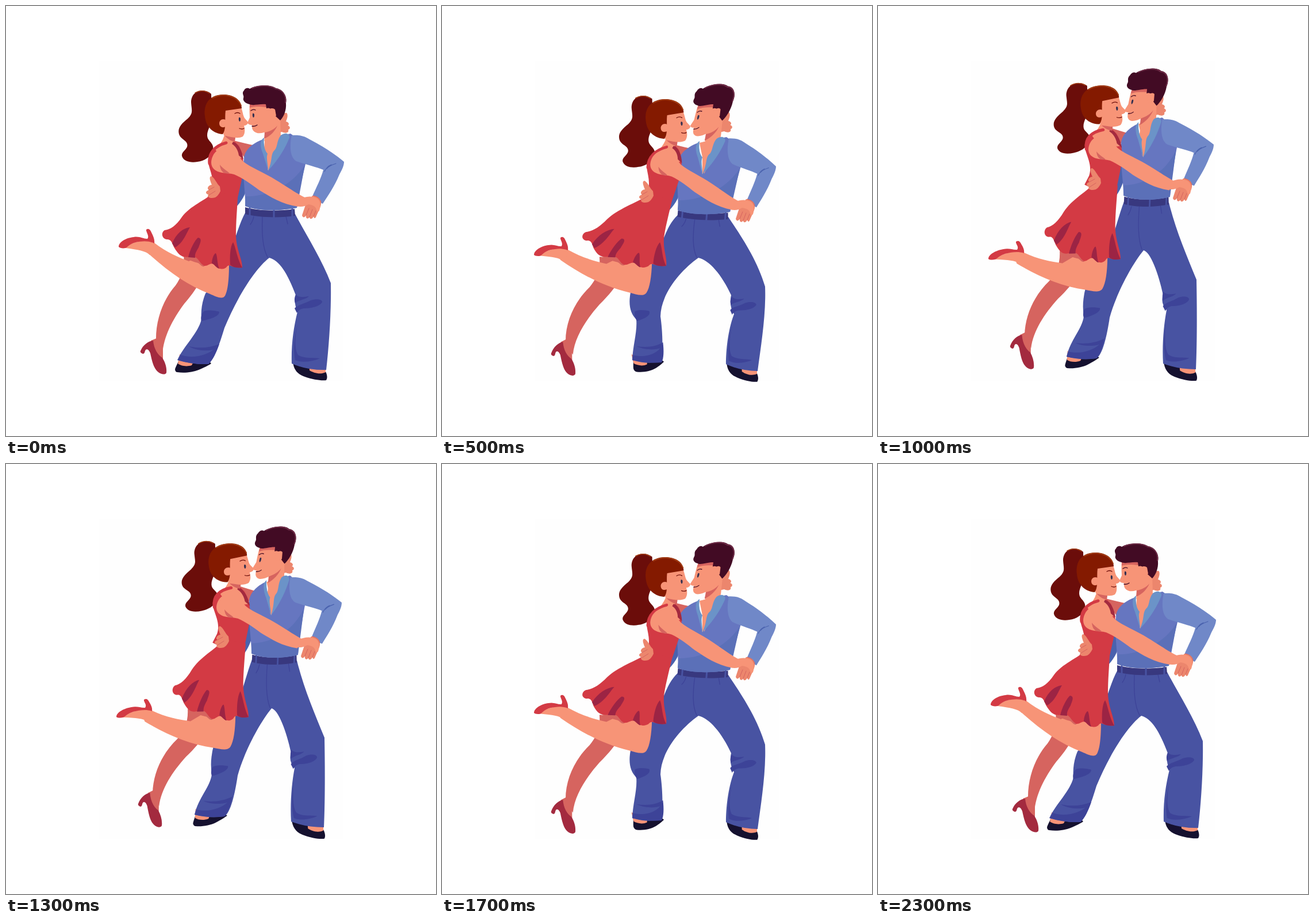
An HTML page that plays this animation: 748 by 748 pixels, repeating every 2400 ms.

```html
<!DOCTYPE html>
<html lang="en">
<head>
<meta charset="utf-8">
<title>Dancing couple</title>
<style>
html, body { margin: 0; width: 100%; height: 100%; overflow: hidden; background: #fff; }
svg { display: block; width: 100vw; height: 100vh; }
</style>
</head>
<body>
<svg id="stage" viewBox="0 0 748 748"><rect x="161" y="96" width="426" height="556" fill="#fefefe"/></svg>
<script>
const SKIN = '#f79477', SHADE = '#d6645f', HAND = '#ec866d';
const RED = '#d33a44', WINE = '#9c2444', SHOE = '#a32a3f';
const PANTS = '#4853a2', FOLD = '#3d4398', BELT = '#38387f', INK = '#15112f';
const SHIRT = '#6676c0', SLEEVE = '#7088c8', COLLAR = '#6b93c8', DEEP = '#4a62ae';
const MANE = '#420b24', TAIL = '#6b0d0a', CAP = '#841a00';

// Anchor points of each body part in four key poses: low left, rising, top, low right.
// One point moves a part, two turn it, three shear it.
const rigs = {
  head: ['445 139 488 165 421 203', '470 110 504 136 430 181', '477 97 510 123 435 168', '475 137 508 162 433 208'],
  neck: ['456 286 478 225 447 222', '460 262 484 198 454 198', '460 250 485 185 457 184', '456 292 485 228 456 225'],
  torso: ['518 226 417 350 505 352', '515 198 428 332 507 333', '513 184 427 321 502 322', '518 232 411 357 500 359'],
  sleeve: ['518 226 588 272 541 338', '515 198 584 242 540 307', '513 184 579 230 537 293', '518 232 581 280 538 344'],
  clasp: ['530 350', '528 320', '524 306', '526 356'],
  pelvis: ['416 356 503 360 458 438', '428 338 506 340 462 425', '427 326 501 328 456 417', '410 361 498 366 446 438'],
  shinR: ['565 482 557 632 498 622', '554 476 553 632 496 622', '543 474 552 630 493 622', '562 488 549 635 494 623'],
  shinL: ['340 545 352 623 299 616', '358 540 380 613 328 610', '360 532 388 610 340 606', '338 545 382 620 331 616'],
  neckHand: ['484 204', '491 174', '495 161', '495 203'],
  backHand: ['360 315', '375 301', '374 289', '355 323'],
  face: ['325 272 340 146 421 201', '332 257 346 133 431 181', '335 245 349 120 434 167', '334 281 348 155 432 208'],
  bodice: ['353 265 405 243 402 335', '361 240 415 222 415 314', '363 228 414 211 413 304', '358 272 412 250 399 340'],
  skirt: ['376 334 272 394 411 455', '391 316 290 390 422 440', '390 305 286 380 416 432', '370 339 245 397 390 452'],
  leg: ['387 452 378 508 258 413', '398 442 387 496 254 430', '393 432 381 488 241 431', '364 450 352 503 219 425'],
  foot: ['196 419 246 388 258 413', '192 440 242 409 254 430', '178 442 229 410 241 431', '160 433 208 402 219 425'],
  farLeg: ['310 436 330 487 261 583', '317 430 337 479 255 573', '308 422 327 470 239 562', '275 440 298 488 215 585'],
  farFoot: ['261 583 234 600 279 640', '255 573 230 591 271 631', '239 562 212 579 255 618', '215 585 190 604 232 642'],
  arm: ['372 262 515 342', '380 240 513 314', '382 227 508 301', '377 266 511 348']
};

const trousers = [
  'M417 358L503 362C522 398 549 440 565 482C566 530 562 590 557 633Q525 634 497 622C496 590 500 560 507 532Q500 515 504 503C490 465 475 442 458 438C430 460 400 512 380 560C371 590 362 615 352 623Q325 624 298 616C310 590 334 570 340 545Q338 522 347 500C390 460 396 395 417 358Z',
  'M428 340L506 342C518 390 536 432 554 476C555 530 555 590 553 632Q522 632 496 622C494 590 497 555 502 529Q491 516 496 503C488 465 474 428 462 425C440 452 414 502 403 542C398 575 391 606 380 613Q355 617 328 610C335 580 355 562 358 540Q354 515 362 487C404 440 411 385 428 340Z',
  'M427 328L501 331C510 388 525 430 543 474C546 530 550 590 552 630Q518 632 493 622C490 590 490 550 493 523Q482 514 487 500C478 465 470 421 456 417C432 452 409 500 403 537C400 570 398 601 388 610Q365 613 340 606C343 580 358 552 360 532Q351 512 356 482C402 435 409 375 427 328Z',
  'M411 363L498 367C518 397 548 440 562 488C564 535 555 590 549 635Q520 635 494 623C494 600 497 565 508 536Q499 522 503 503C487 468 465 442 446 438C415 460 381 500 380 540C383 560 385 592 382 613Q370 627 331 616C332 590 340 567 338 545Q322 530 328 498C386 440 380 390 411 363Z'
];

// [rig, colour, outline, line width when it is a stroke]
const parts = [
  ['neckHand', HAND, 'M474 200C480 190 486 183 489 187C491 192 488 198 487 201C493 202 493 207 490 208C495 209 495 214 491 215C493 221 486 222 480 219L466 222Z'],
  ['torso', DEEP, 'M414 268L398 352C410 340 417 328 420 312Z'],
  ['shinR', INK, 'M499 612C498 633 508 641 520 645C534 650 548 652 557 651C560 646 558 640 556 636L535 616Z'],
  ['shinR', SKIN, 'M527 616L556 620L556 637C546 642 535 638 528 634Z'],
  ['shinL', INK, 'M303 608C301 619 295 627 294 632C294 635 296 637 298 637C310 639 325 637 335 633C345 629 352 625 357 622L346 610Z'],
  ['shinL', SKIN, 'M302 606L330 612L323 625C314 628 304 626 299 622Z'],
  [null, PANTS, trousers],
  ['shinR', FOLD, 'M502 526C508 519 520 518 530 512C540 509 550 510 550 515C546 523 530 526 518 526C512 527 508 530 506 534Z'],
  ['shinR', FOLD, 'M504 502C510 508 519 506 527 505C521 511 509 511 503 517C501 512 502 506 504 502Z'],
  ['shinR', FOLD, 'M507 554C502 576 502 598 508 607C518 614 535 611 546 613C532 619 514 621 503 616C499 596 502 572 507 554Z'],
  ['shinL', FOLD, 'M344 531C352 528 366 530 371 532C371 540 355 545 340 548C338 543 340 536 344 531Z'],
  ['shinL', FOLD, 'M304 607C322 613 344 610 361 598C352 600 333 601 318 592C336 596 354 595 371 588C366 603 359 617 352 623Q325 624 299 616Z'],
  ['pelvis', FOLD, 'M446 367C445 395 446 420 455 437M431 366C430 372 428 376 425 380M487 366L490 379', 1.3],
  ['pelvis', BELT, 'M416 350C440 357 475 357 502 353L503 365C475 369 440 368 416 362Z'],
  ['pelvis', PANTS, 'M424 351V366M466 354V369M498 351V367', 3],
  ['bodice', SHADE, 'M396 234C408 237 420 240 434 243L415 264C408 254 402 246 396 234Z'],
  ['torso', SHIRT, 'M447 232C430 238 415 250 414 264C411 300 417 325 416 348C440 357 475 357 506 351C510 320 515 300 521 275C527 260 515 235 495 222L480 225L456 286Z'],
  ['torso', '#5b70b8', 'M417 331C455 332 498 312 520 276L506 351C475 357 440 357 416 348Z'],
  ['torso', SKIN, 'M449 232L455 257L456 286L468 268L482 240L480 224Z'],
  ['neck', SKIN, 'M449 216C452 232 449 240 449 250L456 286C463 270 466 250 476 233C480 225 476 210 478 190Z'],
  ['neck', SHADE, 'M450 220C460 218 467 214 472 208C468 218 460 226 449 231Z'],
  ['torso', COLLAR, 'M449 229C441 234 442 245 447 257L456 286C456 275 452 265 455 257C449 250 448 240 449 229Z'],
  ['torso', COLLAR, 'M478 225C486 219 494 222 493 229C485 250 470 272 456 286C464 268 460 259 466 252C473 247 470 235 478 225Z'],
  ['head', SKIN, 'M424 168C423 182 424 189 424 194L420 203C421 206 425 207 428 207C427 214 430 219 437 221C448 223 463 215 474 203L480 188L470 165Z'],
  ['head', SHADE, 'M424 169L453 167L453 176C442 175 432 174 424 177Z'],
  ['head', MANE, 'M413 160C415 156 409 152 414 147C416 142 421 142 424 144C435 137 460 136 470 143C482 145 490 158 487 169C488 182 483 193 477 199L466 189C464 180 459 176 453 178L452 171C440 170 430 174 424 171C419 170 411 166 413 160Z'],
  ['head', '#6c2a45', 'M428 143C440 138 459 137 469 144C480 145 488 155 486 168', 2],
  ['head', SKIN, 'M468 180C464 176 456 178 456 185C456 192 464 195 470 191Z'],
  ['head', MANE, 'M426 182Q430 179 434 181M428 209Q433 210 437 207', 1.3],
  ['head', '#343050', 'M429 187Q432 186 432 190Q432 194 430 194Q428 191 429 187Z'],
  ['farLeg', SHADE, 'M309 432C311 455 306 470 295 486C274 510 260 545 261 583L272 606C274 575 290 545 310 518C322 504 333 490 345 465L340 436Z'],
  ['farFoot', SHADE, 'M252 582C255 598 262 608 273 615L273 592L262 578Z'],
  ['farFoot', SHOE, 'M234 600C238 590 247 583 256 582C257 596 264 607 272 612C277 620 280 629 279 638C277 642 270 641 265 637C257 631 254 618 251 604C249 599 246 596 243 598C241 600 242 605 238 605C235 604 233 602 234 600Z'],
  ['leg', SKIN, 'M388 448C388 475 386 495 381 504C377 511 366 506 355 501C315 486 280 460 247 430C243 420 250 411 258 412C280 429 300 437 318 444L345 430Z'],
  ['foot', SKIN, 'M208 421C214 413 225 411 238 408C247 407 255 410 261 416L250 433C243 426 230 424 208 421Z'],
  ['foot', RED, 'M196 419C196 410 210 403 222 402C232 400 238 405 246 405C250 400 243 393 244 389C248 386 251 389 253 394C256 400 259 406 258 413C248 408 236 409 226 411C214 414 211 420 208 421C203 422 198 421 196 419Z'],
  ['face', TAIL, 'M357 153C345 142 322 146 322 168C323 182 326 186 316 196C305 205 298 212 301 223C304 233 318 234 315 245C312 252 305 254 306 261C309 271 322 273 333 271C350 269 363 256 360 244C358 236 350 234 350 225C350 215 357 208 358 195Z'],
  ['face', '#a43f16', 'M329 151Q342 144 354 152', 1.5],
  ['bodice', RED, 'M386 238C362 244 350 256 352 274C356 290 363 303 357 320L349 336L380 350L402 338L411 298C414 280 415 264 405 243L397 235Z'],
  ['skirt', SHADE, 'M306 425L350 430L345 453C340 454 338 449 334 447C326 445 316 441 308 436Z'],
  ['skirt', RED, 'M366 322C346 338 320 348 306 367C296 382 286 389 276 390C269 394 271 405 280 406C288 405 289 414 293 421C298 429 303 435 309 436C317 438 323 435 329 437C335 439 337 448 345 452C352 453 356 445 362 450C368 457 376 460 383 455C388 447 392 454 398 454C402 455 407 456 411 455C411 440 401 425 400 400C400 375 402 355 403 333Z'],
  ['skirt', WINE, 'M289 413C296 396 308 386 320 385C314 394 309 412 294 420Z'],
  ['skirt', WINE, 'M317 437C320 424 328 408 334 403C342 404 338 412 335 420C331 427 328 431 329 438Z'],
  ['skirt', WINE, 'M358 448C358 440 362 430 365 430C368 435 367 448 371 457C366 456 362 448 358 448Z'],
  ['skirt', WINE, 'M390 450C389 436 390 418 395 411C400 420 402 440 411 455C404 456 395 455 390 450Z'],
  ['bodice', SKIN, 'M382 210C381 228 376 238 364 249C370 262 390 270 411 264C404 252 401 244 397 237L400 225Z'],
  ['bodice', RED, 'M383 238C364 243 352 255 354 274', 5],
  ['bodice', SHOE, 'M395 236C404 239 411 252 413 267L405 260C404 252 400 244 393 240Z'],
  ['face', SHADE, 'M399 228L398 236C392 235 386 232 380 225Z'],
  ['face', SKIN, 'M380 178L409 176C412 184 412 190 415 195L421 202C421 206 417 208 414 208C416 215 416 222 412 227C404 231 394 229 379 225C375 214 378 190 380 178Z'],
  ['face', CAP, 'M346 192C343 168 356 154 378 154C397 154 410 164 410 178L382 182C380 196 384 213 377 223C362 222 348 212 346 192Z'],
  ['face', '#a43f16', 'M359 160C378 150 402 156 409 173', 1.8],
  ['face', SKIN, 'M382 198C376 195 371 199 371 204C371 211 378 213 383 209Z'],
  ['face', TAIL, 'M398 187Q403 184 407 187M406 213Q411 215 414 213', 1.3],
  ['face', '#343050', 'M405 194Q408 193 408 197Q408 201 406 201Q404 198 405 194Z'],
  ['backHand', HAND, 'M372 314C367 310 362 297 357 296C352 297 356 306 358 311C351 312 349 318 353 320C346 322 347 327 352 328C349 332 355 336 364 333C368 331 371 326 373 322Z'],
  ['backHand', SHADE, 'M353 320L362 315M353 329L364 322', 1],
  ['sleeve', SLEEVE, 'M497 225C514 224 520 227 530 233C555 246 575 260 588 271C588 278 584 286 580 293C571 315 560 330 551 344C545 342 538 337 533 331C540 315 548 300 552 285C540 280 522 276 505 270C492 262 494 238 497 225Z'],
  ['sleeve', DEEP, 'M554 288C557 281 561 278 566 276M558 283C562 278 568 276 574 274', 1.2],
  ['arm', SKIN, 'M357 272C358 256 370 245 385 248C397 252 405 262 412 270C425 281 450 290 470 303C490 315 508 328 522 334L508 349C480 345 460 332 440 320C427 310 411 299 397 293C390 291 382 291 376 290C364 288 357 282 357 272Z'],
  ['arm', SHADE, 'M372 276C377 283 384 286 389 291C380 293 373 289 372 276Z'],
  ['clasp', HAND, 'M522 343L515 364C516 369 520 368 522 364C521 371 526 371 528 367C528 372 533 371 535 366C536 371 539 369 540 365L547 349C551 339 545 330 533 330Z'],
  ['clasp', SKIN, 'M507 337C518 332 530 329 540 334C547 338 548 346 545 356C543 359 540 358 540 354C539 349 534 346 526 345C520 349 513 350 506 348Z'],
  ['clasp', SHADE, 'M522 364L527 352M528 367L533 354M535 366L539 356M535 330Q545 332 548 341', 1]
];

// Share of each key pose in the six steps of the sway
const mix = [[1, 0, 0, 0], [0, 1, 0, 0], [-.2, .75, .5, -.05], [0, 0, 1, 0], [.2, -.5, 1, .3], [0, 0, 0, 1]];
const number = /-?\d+(\.\d+)?/g;
const values = text => text.match(number).map(Number);
const blend = (poses, w) => poses[0].map((_, i) => poses.reduce((sum, p, k) => sum + p[i] * w[k], 0));

// Fill missing anchors so that every rig has three
function triad(p) {
  const [x, y] = p;
  const [u, v] = p.length > 2 ? p.slice(2, 4) : [x + 100, y];
  const [s, t] = p.length > 4 ? p.slice(4) : [x - v + y, y + u - x];
  return [x, y, u - x, v - y, s - x, t - y];
}

function affine(from, to) {
  const [x, y, a, b, c, d] = triad(from);
  const [X, Y, A, B, C, D] = triad(to);
  const det = a * d - b * c;
  const m = [(A * d - C * b) / det, (B * d - D * b) / det, (C * a - A * c) / det, (D * a - B * c) / det];
  return `matrix(${m} ${X - m[0] * x - m[2] * y} ${Y - m[1] * x - m[3] * y})`;
}

const stage = document.getElementById('stage');
const nodes = parts.map(([rig, colour, d, width]) => {
  const node = document.createElementNS(stage.namespaceURI, 'path');
  node.setAttribute('d', rig ? d : d[0]);
  node.setAttribute('fill', width ? 'none' : colour);
  if (width) {
    node.setAttribute('stroke', colour);
    node.setAttribute('stroke-width', width);
    node.setAttribute('stroke-linecap', 'round');
  }
  return stage.appendChild(node);
});

for (const name in rigs) rigs[name] = rigs[name].map(values);
const cloth = trousers.map(values);

function pose(step) {
  const w = mix[step], moves = {};
  for (const name in rigs) moves[name] = affine(rigs[name][0], blend(rigs[name], w));
  nodes.forEach((node, i) => {
    const rig = parts[i][0];
    if (rig) return node.setAttribute('transform', moves[rig]);
    const now = blend(cloth, w);
    let n = 0;
    node.setAttribute('d', trousers[0].replace(number, () => now[n++].toFixed(1)));
  });
}

let shown = -1;
function tick() {
  const slot = Math.floor(performance.now() % 2400 / 100) % 12;
  const step = slot < 6 ? slot : 11 - slot;
  if (step !== shown) pose(shown = step);
  requestAnimationFrame(tick);
}
tick();
</script>
</body>
</html>
```
